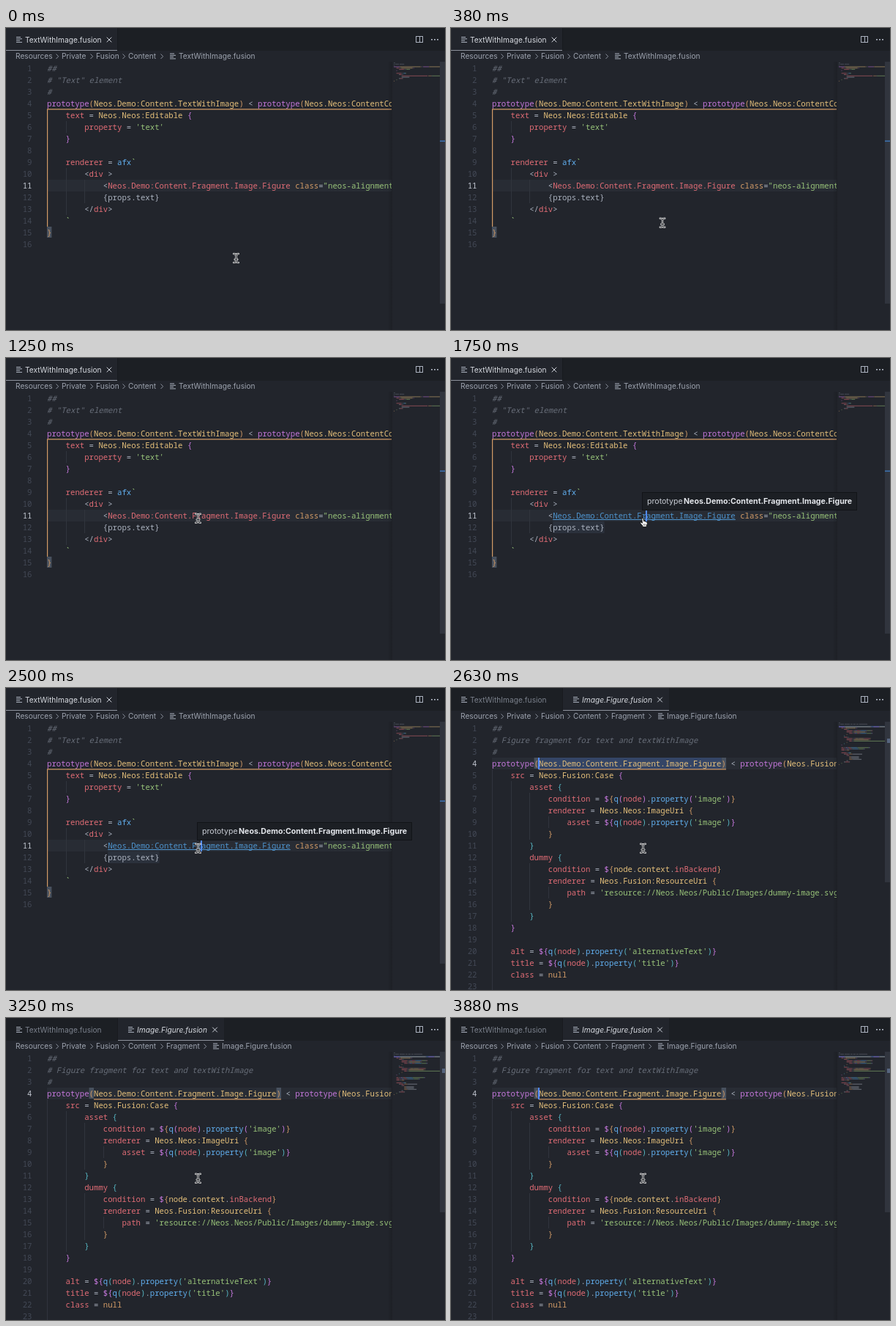
Animation of 600x412 px, one loop 4.01 s. Source, as an HTML page with a canvas:

```html
<!DOCTYPE html>
<html lang="en">
<head>
<meta charset="utf-8">
<title>Go to definition</title>
<style>
  html, body { margin: 0; width: 100%; height: 100%; overflow: hidden; background: #22252c; }
  canvas { display: block; }
</style>
</head>
<body>
<canvas id="stage" width="600" height="412"></canvas>
<script>
const ctx = document.getElementById('stage').getContext('2d');
const LOOP = 4010, STEP = 125;
const CLICK = 750, LINK = 1500, HOVER = 1750, PRESS = 2500, OPEN = 2630;
const CODE_X = 56, CODE_END = 527, CHAR = 6.4, ROW = 16;
const CODE_FONT = '500 10.67px "Noto Sans Mono", monospace';
const UI_FONT = '10.2px Inter, sans-serif';
const TIP_FONT = '10.6px Inter, sans-serif';

const C = {
  bg: '#22252c', bar: '#1c1f24', fg: '#abb2bf', dim: '#7b818c', comment: '#686e79',
  number: '#434956', red: '#e06c75', gold: '#e5c07b', orange: '#d19a66', green: '#98c379',
  purple: '#c678dd', blue: '#61afef', cyan: '#56b6c2', link: '#4e94ce',
  caret: '#528bff', guide: '#30343d', line: '#282c34', box: '#48515e'
};
const BRACKETS = [C.orange, C.purple, C.cyan];

const textFile = [
  '##',
  '# "Text" element',
  '#',
  'prototype(Neos.Demo:Content.TextWithImage) < prototype(Neos.Neos:ContentComponent) {',
  '    text = Neos.Neos:Editable {',
  "        property = 'text'",
  '    }',
  '',
  '    renderer = afx`',
  '        <div >',
  '            <Neos.Demo:Content.Fragment.Image.Figure class="neos-alignment" {...props} />',
  '            {props.text}',
  '        </div>',
  '    `',
  '}',
  ''
];

const figureFile = [
  '##',
  '# Figure fragment for text and textWithImage',
  '#',
  'prototype(Neos.Demo:Content.Fragment.Image.Figure) < prototype(Neos.Fusion:Component) {',
  '    src = Neos.Fusion:Case {',
  '        asset {',
  "            condition = ${q(node).property('image')}",
  '            renderer = Neos.Neos:ImageUri {',
  "                asset = ${q(node).property('image')}",
  '            }',
  '        }',
  '        dummy {',
  '            condition = ${node.context.inBackend}',
  '            renderer = Neos.Fusion:ResourceUri {',
  "                path = 'resource://Neos.Neos/Public/Images/dummy-image.svg'",
  '            }',
  '        }',
  '    }',
  '',
  "    alt = ${q(node).property('alternativeText')}",
  "    title = ${q(node).property('title')}",
  '    class = null',
  '',
  '    renderer = afx`',
  '        <figure class={props.class}>',
  '            <img',
  '                src={props.src}',
  '                alt={props.alt}',
  '                title={props.title}',
  '            />',
  '        </figure>',
  '    `',
  '}'
];

const RULES = [
  [/#.*/y, C.comment],
  [/'[^']*'|"[^"]*"|`/y, C.green],
  [/prototype/y, C.purple],
  [/[A-Z]\w*(?:[.:][A-Z]\w*)+/y, C.gold],
  [/afx|q(?=\()|property(?=\()/y, C.blue],
  [/\w+(?= [={])|div|figure|img|inBackend|node(?=\))/y, C.red],
  [/null|\w+(?==)/y, C.orange],
  [/node|context/y, C.gold],
  [/\{(?:\.\.\.)?props[^}]*\}|\w+/y, C.fg],
  [/\$/y, C.purple],
  [/[{}()]/y, null],
  [/[^\s]/y, C.fg]
];

// Bracket colours follow the nesting depth across the whole file.
function tokenize(lines) {
  let depth = 0;
  return lines.map(line => {
    const tokens = [];
    for (let col = 0; col < line.length;) {
      let text = line[col], color = C.fg;
      for (const [rule, ruleColor] of RULES) {
        rule.lastIndex = col;
        const match = rule.exec(line);
        if (!match) continue;
        text = match[0];
        color = ruleColor;
        break;
      }
      if (!color) {
        if ('})'.includes(text)) depth--;
        color = BRACKETS[depth % 3];
        if ('{('.includes(text)) depth++;
      }
      const isTag = line[col - 1] === '<' && /^[A-Z]/.test(text);
      if (text !== ' ') tokens.push({ col, text, color: isTag ? C.red : color, isTag });
      col += text.length;
    }
    return tokens;
  });
}

const textDoc = { lines: textFile, tokens: tokenize(textFile), rows: 16, active: 11 };
const figureDoc = { lines: figureFile, tokens: tokenize(figureFile), rows: 23, active: 4 };

const colX = col => CODE_X + col * CHAR;
const rowTop = row => 31 + row * ROW;

function rect(x, y, w, h, color) {
  ctx.fillStyle = color;
  ctx.fillRect(x, y, w, h);
}

function label(text, x, y, color, font = UI_FONT) {
  ctx.font = font;
  ctx.fillStyle = color;
  ctx.fillText(text, x, y);
}

function stroke(points, color, width = 1) {
  ctx.beginPath();
  points.forEach(([x, y]) => ctx.lineTo(x, y));
  ctx.strokeStyle = color;
  ctx.lineWidth = width;
  ctx.stroke();
}

function fileIcon(x, y) {
  [6, 8, 5, 8].forEach((w, i) => rect(x, y - 4 + i * 2.3, w, 1, C.fg));
}

function closeIcon(x, y) {
  stroke([[x - 3.3, y - 3.3], [x + 3.3, y + 3.3]], '#d0d4dc');
  stroke([[x + 3.3, y - 3.3], [x - 3.3, y + 3.3]], '#d0d4dc');
}

function drawTabs(opened) {
  const [tabX, tabWidth] = opened ? [153, 145] : [0, 152];
  rect(0, 0, 600, 31, C.bar);
  rect(tabX, 0, tabWidth, 31, C.bg);
  rect(tabX, 30, tabWidth, 1, '#8d929c');
  rect(152, 0, 1, 31, '#181a1f');
  fileIcon(14, 16);
  label('TextWithImage.fusion', 26, 19.6, opened ? C.dim : '#d7dae0');
  if (opened) {
    fileIcon(167, 16);
    label('Image.Figure.fusion', 179, 19.6, '#d7dae0', 'italic ' + UI_FONT);
    closeIcon(285.5, 16);
  } else {
    closeIcon(141, 16);
  }
  ctx.strokeStyle = C.fg;
  ctx.lineWidth = 1;
  ctx.strokeRect(560.5, 11.5, 9, 8);
  stroke([[565.5, 11], [565.5, 20]], C.fg);
  for (let x = 581; x < 592; x += 4) rect(x, 15, 2, 1.6, C.fg);
}

function drawBreadcrumb(opened) {
  const parts = [['Resources', 13], ['Private', 76], ['Fusion', 123], ['Content', 167]];
  const chevrons = [70, 117, 161, 213];
  if (opened) {
    parts.push(['Fragment', 219]);
    chevrons.push(272);
  }
  const iconX = opened ? 283 : 224;
  parts.push([opened ? 'Image.Figure.fusion' : 'TextWithImage.fusion', iconX + 12]);
  parts.forEach(([text, x]) => label(text, x, 42.4, '#9da3af'));
  chevrons.forEach(x => stroke([[x - 1.5, 35.5], [x + 1.7, 38.7], [x - 1.5, 42]], '#8b919d'));
  fileIcon(iconX, 38.5);
}

function drawGuides(doc) {
  for (let row = 1; row <= doc.rows; row++) {
    const line = doc.lines[row - 1];
    const isLast = row === doc.lines.length;
    const indent = line ? line.search(/\S/) : isLast ? 0 : 4;
    for (let col = 0; col < indent; col += 4) {
      rect(Math.round(colX(col)), rowTop(row), 1, ROW, C.guide);
    }
  }
}

function bracketBox(col, row) {
  rect(colX(col), rowTop(row), CHAR, ROW - 1, C.box);
}

function drawCode(doc, linked) {
  for (let row = 1; row <= doc.rows; row++) {
    const baseline = rowTop(row) + 12;
    ctx.textAlign = 'right';
    label(row, 35.5, baseline, row === doc.active ? '#c3c8d2' : C.number, CODE_FONT);
    ctx.textAlign = 'left';
    ctx.save();
    ctx.beginPath();
    ctx.rect(0, 46, CODE_END, 366);
    ctx.clip();
    for (const { col, text, color, isTag } of doc.tokens[row - 1]) {
      const isLink = linked && isTag;
      const font = color === C.comment ? 'italic ' + CODE_FONT : CODE_FONT;
      label(text, colX(col), baseline, isLink ? C.link : color, font);
      if (isLink) rect(colX(col), baseline + 1, text.length * CHAR, 1, C.link);
    }
    ctx.restore();
  }
}

function drawMinimap(doc, opened) {
  const shadow = ctx.createLinearGradient(521, 0, 528, 0);
  shadow.addColorStop(0, 'rgba(0,0,0,0)');
  shadow.addColorStop(1, 'rgba(0,0,0,.14)');
  rect(521, 46, 7, 366, shadow);
  rect(528, 46, 65, 366, C.bg);

  const scale = 0.889;
  ctx.save();
  ctx.beginPath();
  ctx.rect(530, 46, 63, 366);
  ctx.clip();
  if (opened) rect(530, 51.8, 63, 1.8, '#2b4670');
  ctx.globalAlpha = 0.48;
  doc.tokens.forEach((tokens, i) => {
    for (const { col, text, color } of tokens) {
      for (const word of text.matchAll(/\S+/g)) {
        rect(530 + (col + word.index) * scale, 47 + i * 2 * scale, word[0].length * scale, 1.1, color);
      }
    }
  });
  ctx.restore();

  rect(593, 46, 7, opened ? 219 : 330, '#31353e');
  if (opened) rect(596, 69, 4, 6, '#56657f');
  else rect(593, 153.5, 7, 1.6, '#3c72b0');
}

function drawTooltip() {
  rect(261, 183, 294, 25, '#121418');
  rect(262, 184, 292, 23, '#1c1f24');
  label('prototype', 268, 199.3, '#c8ccd4', TIP_FONT);
  label('Neos.Demo:Content.Fragment.Image.Figure', 318, 199.3, '#e4e7ec', 'bold ' + TIP_FONT);
}

function drawBeam(x, y) {
  const path = new Path2D('M-3.2-6Q-.6-6 0-4.6Q.6-6 3.2-6M0-4.6V4.6M-3.2 6Q-.6 6 0 4.6Q.6 6 3.2 6M-1.8 1.8H1.8');
  ctx.save();
  ctx.translate(x + 0.5, y);
  ctx.lineCap = 'round';
  for (const [color, width] of [['#f2f2f2', 2.4], ['#16181c', 0.9]]) {
    ctx.strokeStyle = color;
    ctx.lineWidth = width;
    ctx.stroke(path);
  }
  ctx.restore();
}

function drawHand(x, y) {
  const hand = new Path2D('M-2.8-4.6Q-2.6-6-1.4-5.8Q-.6-5.6-.5-4.3L-.1-1.6Q1.1-2.2 1.7-1.1Q2.8-1.6 3.3-.5Q4.8-.8 4.8 1Q4.8 3 3.7 4.6V6.2H-1.8V5Q-3.4 3-4.7 1.2Q-5.3 0-4.3-.2Q-3.4-.2-2.2 1Z');
  ctx.save();
  ctx.translate(x, y);
  ctx.fillStyle = '#fff';
  ctx.strokeStyle = '#111';
  ctx.lineWidth = 1;
  ctx.fill(hand);
  ctx.stroke(hand);
  for (const fold of [-0.6, 1, 2.6]) stroke([[fold, 2], [fold, 4.6]], '#333', 0.6);
  ctx.restore();
}

function drawMouse(t) {
  const p = Math.min(t / CLICK, 1);
  const ease = p * p * (3 - 2 * p);
  const settle = Math.min(Math.max((t - 880) / 250, 0), 1);
  const x = 314 - 50 * ease - 2 * settle;
  const y = 314 - 94.5 * ease - 0.7 * settle;
  if (t >= LINK && t < PRESS) drawHand(x + 1.6, y + 5.4);
  else drawBeam(x, y);
}

function caretVisible(t) {
  const start = t >= OPEN ? OPEN : t >= PRESS ? PRESS : CLICK;
  return t >= start && Math.floor((t - start) / 500) % 2 === 0;
}

function drawTextEditor(t) {
  rect(CODE_X, rowTop(11), CODE_END - CODE_X, ROW, C.line);
  drawGuides(textDoc);
  if (t >= HOVER) rect(colX(13), rowTop(12), 11 * CHAR, ROW, '#2b313c');
  bracketBox(0, 15);
  stroke([[CODE_END, 110.8], [CODE_X + 0.6, 110.8], [CODE_X + 0.6, rowTop(15)]], C.orange, 1.2);
  drawCode(textDoc, t >= LINK);
  if (caretVisible(t)) rect(266, rowTop(11), 2, ROW, C.caret);
  drawMinimap(textDoc, false);
  if (t >= HOVER) drawTooltip();
}

function drawFigureEditor(t) {
  rect(CODE_X, rowTop(4), CODE_END - CODE_X, ROW, C.line);
  drawGuides(figureDoc);
  if (t < 3000) rect(colX(10), rowTop(4), 39 * CHAR, ROW, '#344566');
  bracketBox(9, 4);
  bracketBox(49, 4);
  stroke([[colX(10), 110.8], [colX(50), 110.8]], C.orange, 1.2);
  drawCode(figureDoc, false);
  if (caretVisible(t)) rect(119, rowTop(4), 2, ROW, C.caret);
  drawMinimap(figureDoc, true);
}

function draw(t) {
  const opened = t >= OPEN;
  rect(0, 0, 600, 412, C.bg);
  drawTabs(opened);
  drawBreadcrumb(opened);
  if (opened) drawFigureEditor(t);
  else drawTextEditor(t);
  drawMouse(t);
}

function frame(now) {
  const step = Math.floor((now % LOOP) / STEP);
  draw(Math.round(step * STEP / 10) * 10);
  requestAnimationFrame(frame);
}
requestAnimationFrame(frame);
</script>
</body>
</html>
```
